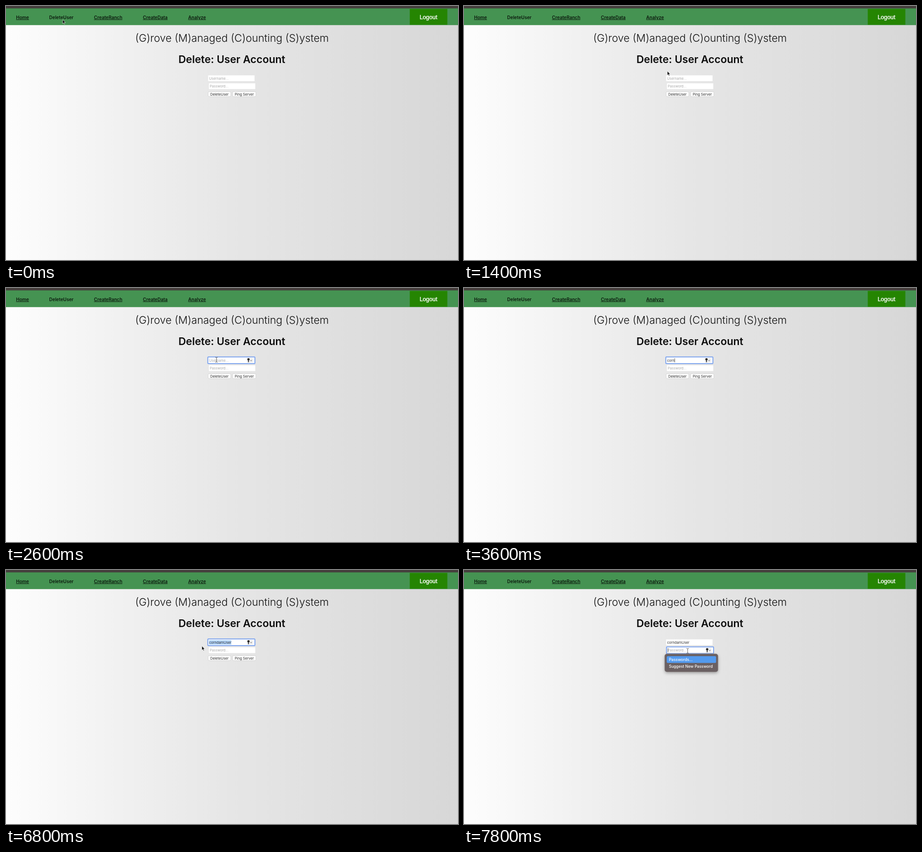
Animation, 998 px wide and 561 px high, one loop 8000 ms. Source, as an HTML page:

```html
<!DOCTYPE html>
<html lang="en">
<head>
<meta charset="utf-8">
<title>Delete user account</title>
<style>
  html, body { margin: 0; width: 100%; height: 100%; overflow: hidden; }
  svg { display: block; width: 100vw; height: 100vh; font-family: Inter, sans-serif; }
  text { white-space: pre; }
  .nav { font-size: 10px; font-weight: 600; fill: #0c1a0e; }
  .nav .link { text-decoration: underline; text-decoration-thickness: .7px; }
  .logout { font: 12.8px "Liberation Sans", sans-serif; fill: #fff; stroke: #fff; stroke-width: .45; }
  .title { font-size: 23.2px; font-weight: 350; fill: #111; }
  .heading { font-size: 23px; font-weight: 600; fill: #0d0d0d; }
  .hint { font-size: 7.5px; fill: #a8a8a8; }
  .typed { font-size: 7.65px; fill: #333; }
  .button rect { fill: #fff; stroke: #c6c6c6; stroke-width: .7; }
  .button text { font-size: 7.7px; fill: #2c2c2c; }
  .menu text { font-size: 8.55px; font-weight: 500; fill: #fff; }
  .ring { fill: none; stroke: #7da4ee; stroke-width: 2; }
</style>
</head>
<body>
<svg viewBox="0 0 998 561" preserveAspectRatio="none">
  <defs>
    <linearGradient id="page">
      <stop offset="0" stop-color="#fdfdfd"/>
      <stop offset=".25" stop-color="#f1f1f1"/>
      <stop offset=".5" stop-color="#e6e6e6"/>
      <stop offset="1" stop-color="#d7d7d7"/>
    </linearGradient>
    <filter id="shade" x="-20%" y="-30%" width="140%" height="180%">
      <feDropShadow dx="0" dy="2.5" stdDeviation="3" flood-opacity=".3"/>
    </filter>
  </defs>

  <rect width="998" height="561" fill="url(#page)"/>
  <rect width="998" height="42.2" fill="#459352"/>
  <rect width="998" height="5.3" fill="#453f3d"/>
  <g class="nav">
    <text class="link" x="22.3" y="28.7">Home</text>
    <text x="95.3" y="28.7">DeleteUser</text>
    <text class="link" x="194.3" y="28.7">CreateRanch</text>
    <text class="link" x="302.3" y="28.7">CreateData</text>
    <text class="link" x="402.3" y="28.7">Analyze</text>
  </g>
  <rect x="891.5" y="6.5" width="83" height="35" fill="#258502"/>
  <text class="logout" x="932.7" y="28.6" text-anchor="middle">Logout</text>

  <text class="title" x="499" y="78.5" text-anchor="middle">(G)rove (M)anaged (C)ounting (S)ystem</text>
  <text class="heading" x="498.7" y="126.3" text-anchor="middle">Delete: User Account</text>

  <rect x="446.4" y="153.2" width="102.4" height="12.8" fill="#fff"/>
  <rect x="448" y="170.7" width="102.4" height="12.8" fill="#fff"/>
  <rect id="selection" x="448.4" y="155" height="10" fill="#b4d7fd"/>
  <text id="userHint" class="hint" x="448.4" y="162.7">Username...</text>
  <text id="typed" class="typed" x="448.4" y="162.7"></text>
  <text class="hint" x="450" y="180.2">Password...</text>

  <g class="button">
    <rect x="446.2" y="189.2" width="50.2" height="10.8" rx="2.5"/>
    <text x="471.2" y="197.5" text-anchor="middle">DeleteUser</text>
    <rect x="500.2" y="189.2" width="51.6" height="10.8" rx="2.5"/>
    <text x="526" y="197.5" text-anchor="middle">Ping Server</text>
  </g>

  <g id="focus">
    <rect class="ring" x="445.6" y="152.2" width="104" height="14.8" rx="1.2"/>
    <rect x="531.5" y="154.5" width="13.5" height="10.5" rx="1.5" fill="#f0f0f0"/>
    <circle cx="535.4" cy="157.4" r="2.5" fill="#222"/>
    <path d="M535.4 158v6" stroke="#222" stroke-width="1.7"/>
    <path d="M539.4 159.3l1.9 1.7 1.9-1.7" fill="none" stroke="#444" stroke-width=".9"/>
  </g>
  <rect id="caret" width=".8" height="9" fill="#333"/>

  <g id="menu" class="menu">
    <rect x="443.2" y="185.2" width="117.6" height="39.8" rx="5" fill="#6a6162" stroke="#857d7d" stroke-width=".8" filter="url(#shade)"/>
    <rect x="447.6" y="190.2" width="109" height="15" rx="2.5" fill="#539aee"/>
    <text x="452.4" y="200.8">Passwords...</text>
    <text x="452.4" y="216">Suggest New Password</text>
  </g>

  <path id="arrow" d="M0 0v9l2-1.9 1.4 3.2 1.5-.6-1.4-3.2h2.8z" fill="#111" stroke="#fff" stroke-width=".6"/>
  <path id="beam" d="M-2.6-5.5q2.6 0 2.6 1.5q0-1.5 2.6-1.5M0-4v8M-2.6 5.5q2.6 0 2.6-1.5q0 1.5 2.6 1.5" fill="none" stroke="#444" stroke-width=".9"/>
</svg>

<script>
const LOOP = 8000, STEP = 100;
const NAME = "corndamUser";
const KEY_TIMES = [2700, 3000, 3200, 3300, 3800, 3900, 4500, 4600, 4900, 5100, 5300];
const USER_FOCUS = 2000, CARET_OFF = 2400, SELECT = 5800;
const PASS_FOCUS = 7400, MENU_OPEN = 7500;
const HIDE = 2700, RETURN = 6800;

// time, x, y
const PATH = [
  [0, 125, 30], [900, 478, 157], [1100, 476, 147], [1200, 476, 147],
  [1400, 449, 144], [1600, 441.5, 148], [1800, 448, 154],
  [2100, 467, 157], [2200, 464.7, 158.5], [2700, 464.7, 158.5],
  [6800, 432.5, 168], [7000, 441, 152], [7100, 452, 147],
  [7400, 488, 174], [7600, 493.8, 178.7], [8000, 493.8, 178.7]
];

const el = id => document.getElementById(id);
const [selection, userHint, typed, focusRing, caret, menu, arrow, beam] =
  ["selection", "userHint", "typed", "focus", "caret", "menu", "arrow", "beam"].map(el);
const show = (node, on) => node.setAttribute("visibility", on ? "visible" : "hidden");
const move = (node, x, y) => node.setAttribute("transform", `translate(${x} ${y})`);
const within = (v, a, b) => v >= a && v < b;

function pointerAt(t) {
  const i = PATH.findIndex(p => p[0] > t);
  const [t0, x0, y0] = PATH[i - 1], [t1, x1, y1] = PATH[i];
  let k = (t - t0) / (t1 - t0);
  if (i === 1) k = k * k * (3 - 2 * k);
  return [x0 + (x1 - x0) * k, y0 + (y1 - y0) * k];
}

function drawPointer(t) {
  const [x, y] = pointerAt(t);
  const visible = t < HIDE || t >= RETURN;
  const overField = within(x, 446, 550) && within(y, 152.5, 184);
  show(arrow, visible && !overField);
  show(beam, visible && overField);
  move(arrow, x, y);
  move(beam, x, y);
}

function drawForm(t) {
  const count = KEY_TIMES.filter(k => k <= t).length;
  const inPass = t >= PASS_FOCUS;
  typed.textContent = NAME.slice(0, count);
  const width = count ? typed.getComputedTextLength() : 0;

  show(userHint, !count);
  show(focusRing, t >= USER_FOCUS);
  move(focusRing, inPass ? 1.5 : 0, inPass ? 17.5 : 0);
  show(selection, within(t, SELECT, PASS_FOCUS));
  selection.setAttribute("width", width);
  show(caret, within(t, USER_FOCUS, CARET_OFF) || within(t, KEY_TIMES[0], SELECT) || inPass);
  move(caret, inPass ? 449.8 : 448.4 + width, inPass ? 172.7 : 155.2);
  show(menu, t >= MENU_OPEN);
}

function render(time) {
  const t = Math.floor(time % LOOP / STEP) * STEP;
  drawForm(t);
  drawPointer(t);
}

const start = performance.now();
function tick() {
  render(performance.now() - start);
  requestAnimationFrame(tick);
}
tick();
</script>
</body>
</html>
```
